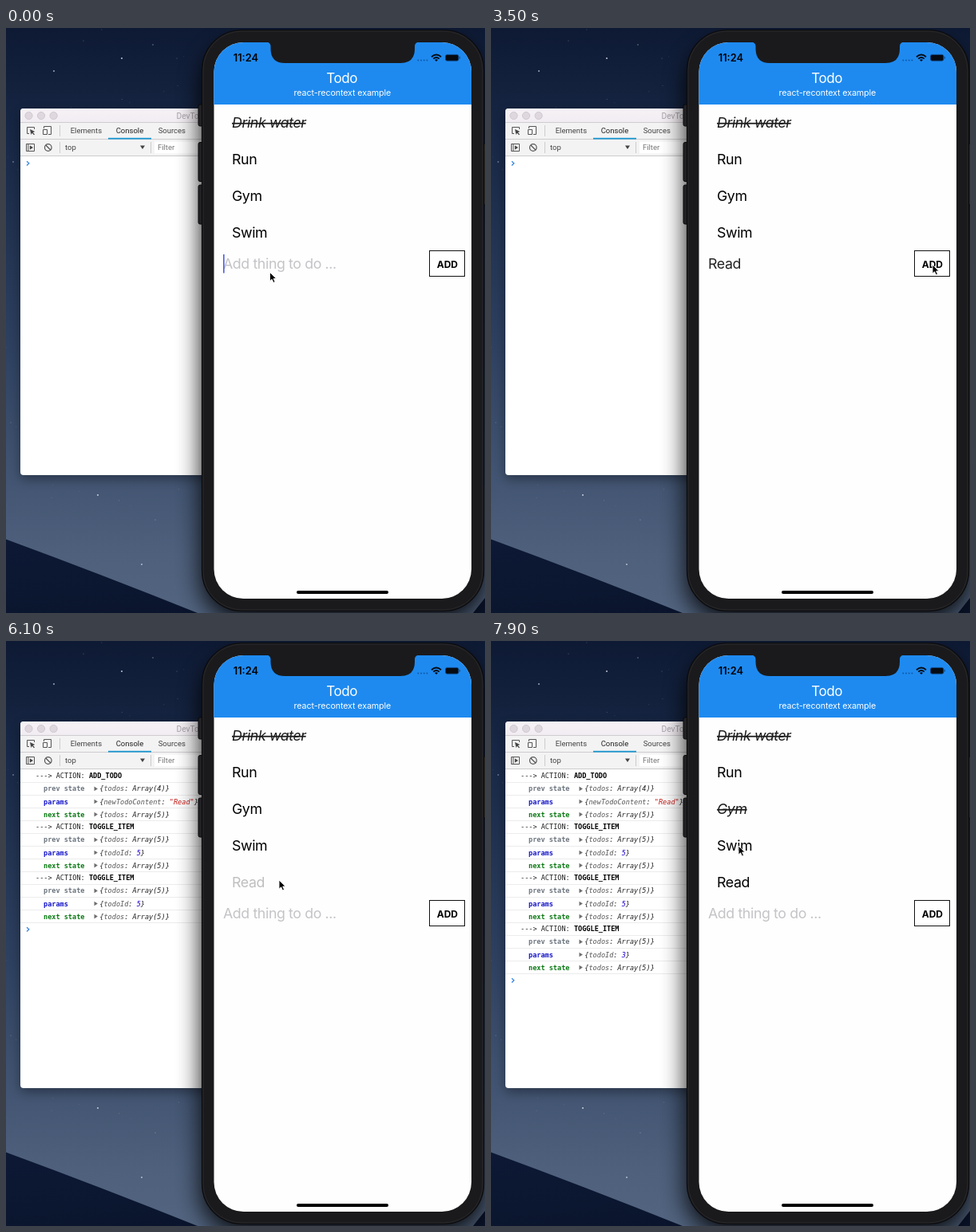
These frames come from a looping animation (600 px wide and 734 px high, 8000 ms). An HTML page:

```html
<!DOCTYPE html>
<html lang="en">
<head>
<meta charset="utf-8">
<title>Todo</title>
<style>
  html, body { margin: 0; width: 100%; height: 100%; overflow: hidden; background: #14233f; }
  svg { display: block; width: 600px; height: 734px; }
  text { white-space: pre; }
  .app { font: 17.8px Inter, sans-serif; letter-spacing: -.4px; }
  .ui { font: 9.5px Roboto, sans-serif; fill: #444; }
  .log { font: 8.56px "DejaVu Sans Mono", monospace; fill: #222; }
  .bold { font-weight: 700; }
  .obj { font-style: italic; }
  .done { font-style: italic; text-decoration: line-through; fill: #1c1c1c; }
</style>
</head>
<body>
<svg viewBox="0 0 600 734">
  <defs>
    <linearGradient id="sky" x2="0" y2="1">
      <stop offset="0" stop-color="#0e1a34"/>
      <stop offset=".2" stop-color="#182846"/>
      <stop offset=".55" stop-color="#2e4160"/>
      <stop offset=".9" stop-color="#4e607c"/>
      <stop offset="1" stop-color="#52647f"/>
    </linearGradient>
    <linearGradient id="dune" x2=".6" y2="1">
      <stop offset="0" stop-color="#0d1935"/>
      <stop offset="1" stop-color="#0a142c"/>
    </linearGradient>
    <linearGradient id="titlebar" x2="0" y2="1">
      <stop offset="0" stop-color="#f6f2f6"/>
      <stop offset="1" stop-color="#f1ecf1"/>
    </linearGradient>
    <filter id="blur" x="-30%" y="-30%" width="160%" height="160%"><feGaussianBlur stdDeviation="15"/></filter>
    <filter id="soft" x="-30%" y="-30%" width="160%" height="160%"><feGaussianBlur stdDeviation="7"/></filter>
    <clipPath id="window"><rect x="18" y="101" width="300" height="460" rx="4"/></clipPath>
    <clipPath id="screen"><rect x="260.5" y="18" width="322.5" height="698" rx="37"/></clipPath>
  </defs>

  <rect width="600" height="734" fill="url(#sky)"/>
  <g id="stars" fill="#e8eefc"></g>
  <path d="M0 641.5Q118 685 240 734H0ZM585 734L600 715V734Z" fill="url(#dune)"/>

  <rect x="18" y="106" width="300" height="460" rx="5" filter="url(#soft)" opacity=".35"/>
  <g clip-path="url(#window)">
    <rect x="18" y="101" width="300" height="460" fill="#fff"/>
    <rect x="18" y="101" width="300" height="18" fill="url(#titlebar)"/>
    <rect x="18" y="119" width="300" height="41" fill="#f3f3f3"/>
    <path d="M18 118.5H318M18 139.5H318M18 160.5H318" stroke="#cfcccf"/>
    <g fill="#ded8de" stroke="#c8c2c8" stroke-width=".8">
      <circle cx="28.5" cy="110" r="4.6"/><circle cx="44" cy="110" r="4.6"/><circle cx="59.6" cy="110" r="4.6"/>
    </g>
    <text class="ui" x="213.5" y="113.7" style="font-size:10.2px;fill:#aaa4aa">DevTools</text>

    <g fill="none" stroke="#555">
      <path d="M29 132.5H26.5V124.5H35.5V127"/>
      <path d="M47.5 126V123.5H56.5V133.5H53M46.5 127.5H51.5V133.5H46.5Z"/>
      <path d="M25.5 145.5H35.5V154.5H25.5ZM27.8 145.5V154.5"/>
      <circle cx="52.8" cy="150" r="4.3" stroke-width="1.2"/>
      <path d="M49.8 147L55.8 153" stroke-width="1.2"/>
      <path d="M67.5 122V136M67.5 143V157M181.5 143V157" stroke="#ccc"/>
    </g>
    <path d="M30 127L36.3 130L33.7 131L36 133.5L35 134.3L32.6 131.8L31.4 134ZM29.8 147.3L34 150L29.8 152.7ZM168 147.4H174L171 152Z" fill="#444"/>
    <g class="ui">
      <text x="80.7" y="131.8">Elements</text>
      <text x="137.7" y="131.8" fill="#222">Console</text>
      <text x="190.7" y="131.8">Sources</text>
      <text x="74" y="153">top</text>
    </g>
    <rect x="128" y="137.8" width="54" height="1.8" fill="#1a97d0"/>
    <rect x="186" y="142.5" width="120" height="15" fill="#fff"/>
    <text class="ui" x="190" y="153.2" style="fill:#777">Filter</text>
    <g id="console" class="log"></g>
    <path id="prompt" d="M26 167.2L28.8 169.8L26 172.4" fill="none" stroke="#3b87e0" stroke-width="1.3"/>
  </g>

  <rect x="244" y="20" width="356" height="724" rx="52" filter="url(#blur)" opacity=".88"/>
  <g fill="#222225" stroke="#08080a">
    <rect x="241" y="96" width="8" height="27" rx="2"/>
    <rect x="241" y="143.5" width="8" height="49" rx="2"/>
    <rect x="241" y="197" width="8" height="49" rx="2"/>
    <rect x="594" y="145" width="8" height="77" rx="2" fill="#2d2b29"/>
  </g>
  <rect x="245.5" y="2.5" width="353" height="729" rx="50" fill="#1a1a1c" stroke="#0b0b0d" stroke-width="1.2"/>
  <rect x="247" y="4" width="350" height="726" rx="48.5" fill="none" stroke="#29292c"/>

  <g clip-path="url(#screen)">
    <rect x="260" y="18" width="324" height="699" fill="#fefefe"/>
    <rect x="260" y="18" width="324" height="78" fill="#1e8af0"/>
  </g>
  <path d="M326 17.5Q331.5 18 331.5 23V26Q331.5 44 349.5 44H494Q512 44 512 26V23Q512 18 517.5 17.5Z" fill="#1a1a1c"/>

  <g class="app">
    <text x="284.8" y="42" style="font-size:12.8px;font-weight:600;letter-spacing:0">11:24</text>
    <g fill="#fff" text-anchor="middle">
      <text x="420.6" y="69" style="font-size:17px">Todo</text>
      <text x="421.4" y="84.7" style="font-size:10.7px;letter-spacing:-.1px">react-recontext example</text>
    </g>
    <g id="items"></g>
    <g id="form">
      <text id="input" x="272" y="302.4"></text>
      <rect id="caret" y="284" width="1.6" height="23.5" fill="#4a5fe0"/>
      <g id="add">
        <rect x="530.5" y="279.5" width="44" height="32" fill="#fff" stroke="#111"/>
        <text x="552.8" y="300.6" text-anchor="middle" style="font-size:12px;font-weight:700;letter-spacing:-.1px">ADD</text>
      </g>
    </g>
  </g>

  <g fill="#0a4a92" opacity=".75">
    <circle cx="516.3" cy="40.6" r="1"/><circle cx="520" cy="40.6" r="1"/><circle cx="523.7" cy="40.6" r="1"/><circle cx="527.4" cy="40.6" r="1"/>
  </g>
  <path d="M533 36.2Q539 30.8 545 36.2M535.3 38.6Q539 35.2 542.7 38.6" fill="none" stroke="#050a12" stroke-width="1.9"/>
  <path d="M537 40L539 42L541 40Q539 38.4 537 40Z" fill="#050a12"/>
  <rect x="550.5" y="33.4" width="16.4" height="7.8" rx="2" fill="#050a12" stroke="#12508f" stroke-width=".8"/>
  <rect x="567.7" y="35.8" width="1.2" height="3" rx=".6" fill="#12508f"/>
  <rect x="364" y="706" width="115" height="4" rx="2" fill="#000"/>

  <path id="cursor" d="M0 0V11.2L2.6 8.8L4.5 13L6.5 12.1L4.7 8H8.2Z" fill="#000" stroke="#fff" stroke-width=".9" stroke-linejoin="round"/>
</svg>

<script>
const LOOP = 8000, ROW = 46, LOG_ROW = 16.1, LOG_BLOCK = 64;
const $ = id => document.getElementById(id);
const make = (parent, tag, attrs, content = '') => {
  const el = document.createElementNS('http://www.w3.org/2000/svg', tag);
  for (const key in attrs) el.setAttribute(key, attrs[key]);
  el.innerHTML = content;
  return parent.appendChild(el);
};

const ADDED = 3850;
const keys = [1000, 1150, 1350, 1600];
const toggles = [{ at: 5350, id: 5 }, { at: 6050, id: 5 }, { at: 7200, id: 3 }];
const names = ['Drink water', 'Run', 'Gym', 'Swim', 'Read'];

// [time, x, y] of the pointer tip
const path = [
  [0, 330.5, 306.5], [2000, 330.5, 306.5], [3100, 553, 297], [4200, 553, 297],
  [4600, 530, 293], [5150, 342, 300], [6400, 342, 300], [6900, 296, 242],
  [7050, 306, 213], [7350, 306, 213], [7800, 310, 257], [LOOP, 310, 257]
];

const stars = [[60, 54, .9], [145, 38, 1], [184, 21, .7], [9, 168, .8], [115, 586, 1], [170, 673, .9],
  [187, 617, .6], [97, 16, .5], [214, 38, .5], [6, 495, .5]];
for (const [cx, cy, r] of stars) make($('stars'), 'circle', { cx, cy, r, opacity: r * .8 });
let seed = 7;
const random = () => (seed = seed * 16807 % 2147483647) / 2147483647;
for (let i = 0; i < 45; i++)
  make($('stars'), 'circle', { cx: random() * 245, cy: random() * 650, r: .5, opacity: .1 + random() * .2 });

const key = name => `<tspan fill="#555">${name}</tspan>: `;
const todos = count => `{${key('todos')}Array(${count})}`;

function addLog(index, at, action, params, before) {
  const block = make($('console'), 'g', { transform: `translate(0 ${index * LOG_BLOCK})` });
  const y = row => 172.3 + row * LOG_ROW;
  make(block, 'text', { x: 37, y: y(0) }, `---&gt; ACTION: <tspan class="bold" fill="#000">${action}</tspan>`);
  const rows = [['prev state', '#6c747e', todos(before)], ['params', '#1414c8', params], ['next state', '#0b7a14', todos(5)]];
  rows.forEach(([label, fill, value], i) => {
    const base = y(i + 1);
    make(block, 'text', { x: 47, y: base, fill, class: 'bold' }, label);
    make(block, 'path', { d: `M110.5 ${base - 5.8}l4.4 2.8l-4.4 2.8z`, fill: '#6e6e6e' });
    make(block, 'text', { x: 117.3, y: base, class: 'obj' }, value);
  });
  for (let i = 0; i < 4; i++)
    make(block, 'path', { d: `M18 ${177.5 + i * 16}H318`, stroke: '#ececec' });
  return { at, block };
}

const logs = [
  addLog(0, ADDED, 'ADD_TODO', `{${key('newTodoContent')}<tspan fill="#c41a16">"Read"</tspan>}`, 4),
  ...toggles.map(({ at, id }, i) =>
    addLog(i + 1, at, 'TOGGLE_ITEM', `{${key('todoId')}<tspan fill="#1c00cf">${id}</tspan>}`, 5))
];
const items = names.map((name, i) => make($('items'), 'text', { x: 283, y: 125.4 + i * ROW }, name));

const clamp = v => Math.max(0, Math.min(1, v));
const smooth = v => v * v * (3 - 2 * v);

// Touch feedback: dims just before release, then recovers.
function pressOpacity(t, at) {
  if (t < at - 120 || t > at + 350) return 1;
  return t < at ? 1 - .8 * clamp((t - at + 120) / 80) : .2 + .8 * smooth(clamp((t - at) / 350));
}

function pointer(t) {
  const i = Math.max(1, path.findIndex(p => p[0] > t));
  const [t0, x0, y0] = path[i - 1], [t1, x1, y1] = path[i];
  const k = smooth((t - t0) / (t1 - t0));
  return [x0 + (x1 - x0) * k, y0 + (y1 - y0) * k];
}

function draw(t) {
  const added = t >= ADDED;
  const typed = added ? '' : 'Read'.slice(0, keys.filter(k => k <= t).length);
  const input = $('input');
  input.textContent = typed || 'Add thing to do ...';
  input.setAttribute('fill', typed ? '#222' : '#c4c4c8');

  const lastKey = keys.filter(k => k <= t).pop() || 0;
  const caretOn = !added && (t - lastKey) % 1000 < 550;
  $('caret').setAttribute('visibility', caretOn ? 'visible' : 'hidden');
  $('caret').setAttribute('x', typed ? 272.3 + input.getComputedTextLength() : 272);
  $('form').setAttribute('transform', `translate(0 ${added ? ROW : 0})`);
  $('add').setAttribute('opacity', pressOpacity(t, ADDED));

  items.forEach((el, i) => {
    const own = toggles.filter(e => e.id === i + 1);
    const flips = own.filter(e => e.at <= t).length + (i === 0);
    el.setAttribute('class', flips % 2 ? 'done' : '');
    el.setAttribute('opacity', Math.min(1, ...own.map(e => pressOpacity(t, e.at))));
    el.setAttribute('visibility', i < 4 || added ? 'visible' : 'hidden');
  });

  const shown = logs.filter(l => t >= l.at).length;
  logs.forEach((l, i) => l.block.setAttribute('visibility', i < shown ? 'visible' : 'hidden'));
  $('prompt').setAttribute('transform', `translate(0 ${shown * LOG_BLOCK})`);
  $('cursor').setAttribute('transform', `translate(${pointer(t)})`);
}

const start = performance.now();
function tick() {
  draw((performance.now() - start) % LOOP);
  requestAnimationFrame(tick);
}
tick();
</script>
</body>
</html>
```
